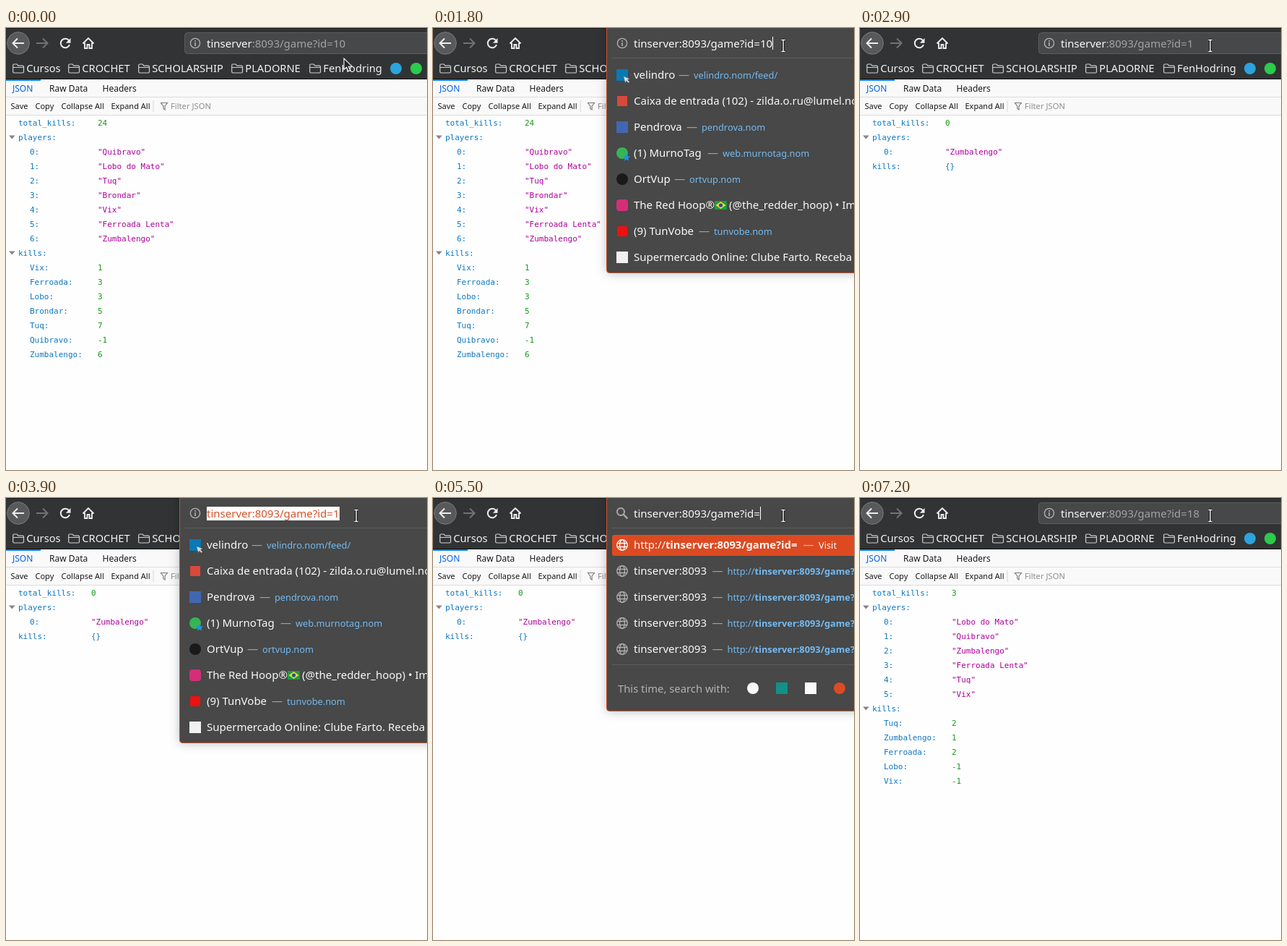
An HTML page that plays this animation: 583 by 611 pixels, repeating every 8 s.

```html
<!DOCTYPE html>
<html lang="en">
<head>
<meta charset="utf-8">
<title>JSON viewer</title>
<style>
  html, body { margin: 0; width: 100%; height: 100%; overflow: hidden; background: #fefefe; }
  svg { display: block; width: 583px; height: 611px; font: 15px "Noto Sans", "Open Sans", sans-serif; }
  text { white-space: pre; }
  .mono { font: 11px "DejaVu Sans Mono", monospace; }
  .key { fill: #0b77c2; }
  .num { fill: #129a12; }
  .str { fill: #ad009b; }
  .mark { font-size: 14.67px; fill: #f4f4f5; }
  .tab { font-size: 12px; }
  .tool { font-size: 11px; fill: #18181a; }
  .link { font-size: 12.8px; fill: #75baf2; }
  .line { fill: none; stroke-width: 1.3; }
  .panel { filter: drop-shadow(0 0 7px rgba(0, 0, 0, .25)); }
</style>
</head>
<body>
<svg id="stage" viewBox="0 0 583 611"></svg>
<script>
const LOOP = 8000;
const HOST = 'tinserver', PORT = ':8093';
const stage = document.getElementById('stage');

const rect = (x, y, w, h, fill, extra = '') =>
  `<rect x="${x}" y="${y}" width="${w}" height="${h}" fill="${fill}" ${extra}/>`;
const disc = (x, y, r, fill) => `<circle cx="${x}" cy="${y}" r="${r}" fill="${fill}"/>`;
const text = (x, y, s, cls = '', fill = '') =>
  `<text x="${x}" y="${y}" class="${cls}" ${fill && `fill="${fill}"`}>${s}</text>`;
const path = (d, stroke, width = 1.3) =>
  `<path d="${d}" class="line" stroke="${stroke}" style="stroke-width:${width}"/>`;
const shape = (d, fill, extra = '') => `<path d="${d}" fill="${fill}" ${extra}/>`;

// JSON pages
const QUI = 'Quibravo', LOBO = 'Lobo do Mato', TUQ = 'Tuq', BRON = 'Brondar',
      VIX = 'Vix', FER = 'Ferroada Lenta', ZUM = 'Zumbalengo';

const pages = {
  first: {
    x: 127, total: 24,
    players: [QUI, LOBO, TUQ, BRON, VIX, FER, ZUM],
    kills: [[VIX, 1], [FER, 3], [LOBO, 3], [BRON, 5], [TUQ, 7], [QUI, -1], [ZUM, 6]]
  },
  second: { x: 118, total: 0, players: [ZUM], kills: [] },
  third: {
    x: 127, total: 3,
    players: [LOBO, QUI, ZUM, FER, TUQ, VIX],
    kills: [[TUQ, 2], [ZUM, 1], [FER, 2], [LOBO, -1], [VIX, -1]]
  }
};

function drawPage(name) {
  let out = rect(0, 70, 583, 541, '#fefefe');
  const page = pages[name];
  if (!page) return out;

  out += rect(0, 71, 583, 50, '#f9f9fa') + rect(0, 95, 583, 1, '#dcdcde') +
    rect(0, 120, 583, 1, '#dcdcde') + rect(0, 71, 48, 2, '#0a84ff') +
    text(9, 88, 'JSON', 'tab', '#0060df') + text(60, 88, 'Raw Data', 'tab', '#18181a') +
    text(133.5, 88, 'Headers', 'tab', '#18181a');
  [[6.5, 'Save'], [40.5, 'Copy'], [76.5, 'Collapse All'], [145.5, 'Expand All']]
    .forEach(([x, s]) => out += text(x, 112, s, 'tool'));
  out += rect(203.5, 100, 1, 16, '#d7d7db') +
    path('M214.5 103.5h9l-3.4 4.5v5l-2.2-1.6v-3.4z', '#77777a', 1.1) +
    `<text x="228" y="112" style="font-size:11.2px" fill="#8e8e92">Filter JSON</text>`;

  let y = 135;
  const row = (x, key, value, cls, fold) => {
    if (fold) out += shape(`M4 ${y - 6.5}h8.6l-4.3 5z`, '#858588');
    out += text(x, y, key + ':', 'mono key');
    if (value !== undefined) out += text(page.x, y, value, 'mono ' + cls);
    y += 20;
  };
  row(17, 'total_kills', page.total, 'num');
  row(17, 'players', undefined, '', true);
  page.players.forEach((p, i) => row(33, i, `"${p}"`, 'str'));
  if (!page.kills.length) {
    row(17, 'kills', '{}', 'key');
  } else {
    row(17, 'kills', undefined, '', true);
    page.kills.forEach(([p, n]) => row(33, p.split(' ')[0], n, 'num'));
  }
  return out;
}

// Browser toolbar
function drawChrome() {
  const ink = '#ededee';
  let out = rect(0, 0, 583, 70, '#323334') + rect(0, 0, 583, 1, '#1c1c1d') +
    rect(0, 70, 583, 1, '#0c0c0d') +
    `<circle cx="17" cy="21" r="15.3" fill="#58595a" stroke="#7b7b7c"/>` +
    path('M25 21H10M16 14.5L9.5 21l6.5 6.5', ink, 2) +
    path('M42 21h15M51 14.5l6.5 6.5-6.5 6.5', '#727274', 2) +
    path('M87.2 17.3A6.3 6.3 0 1 0 88 23.2', ink, 2) + shape('M89.5 14v6.7h-6.7z', ink) +
    path('M106.5 21.5L114 14l7.500 7.500M109 20.500v7.500h3.500v-5h3v5h3.500v-7.500', ink, 1.9);
  [[9, 'Cursos'], [86, 'CROCHET'], [183, 'SCHOLARSHIP'], [312, 'PLADORNE'], [420, 'FenHodring']]
    .forEach(([x, s]) => {
      out += path(`M${x + .7} 60.500v-9q0-1.500 1.500-1.500h3.800l2 2.200h6q1.500 0 1.500 1.500v6.800q0 1.500-1.500 1.500h-11.800q-1.500 0-1.500-1.500zM${x + 1} 54.500h14`, '#cfcfd0', 1.2);
      out += text(x + 19.3, 61, s, 'mark');
    });
  return out + disc(540, 56, 8, '#2ba3dc') + disc(568, 56, 8, '#2bcb4b');
}

const info = () => `<circle cx="262" cy="21" r="6.6" class="line" stroke="#b4b4b5"/>` +
  rect(261.2, 20, 1.6, 5, '#b4b4b5') + rect(261.2, 17, 1.6, 1.8, '#b4b4b5');
const lens = () => `<circle cx="260" cy="19" r="5" class="line" style="stroke-width:2" stroke="#a9a9aa"/>` +
  path('M263.800 22.800l5.500 5.500', '#a9a9aa', 2.4);
const globe = (y, c) => `<g class="line" stroke="${c}"><circle cx="262" cy="${y}" r="7.300"/>` +
  `<ellipse cx="262" cy="${y}" rx="3.400" ry="7.300"/>` +
  `<path d="M255 ${y - 2.5}h14M255 ${y + 2.5}h14"/></g>`;
const box = (y, fill, size = 16, r = 0) =>
  rect(262 - size / 2, y - size / 2, size, size, fill, `rx="${r}"`);
const star = y => shape(`M268 ${y - 5}l1.500 3.300 3.500.400-2.600 2.400.800 3.500-3.200-1.800-3.200 1.800.800-3.500-2.600-2.400 3.500-.400z`, '#2390ee');
const arrowBadge = y => shape(`M264 ${y}l8 3.200-3 1.200 3 3-1.400 1.400-3-3-1.200 3z`, '#d8d8d9');
const flag = y => rect(390, y - 6, 17, 12, '#1b9b43') +
  shape(`M398.500 ${y - 5}l7 5-7 5-7-5z`, '#f7d532') + disc(398.5, y, 2.6, '#2b4a9b');

// Suggestion rows: icon, title, x of the dash, link, optional extra
const history = [
  { icon: y => box(y, '#0c78b4') + arrowBadge(y + 2), title: 'velindro', dash: 340, link: 'velindro.nom/feed/' },
  { icon: y => box(y, '#d9483b', 14), title: 'Caixa de entrada (102) - zilda.o.ru@lumel.nom' },
  { icon: y => box(y, '#4267b2'), title: 'Pendrova', dash: 351, link: 'pendrova.nom' },
  { icon: y => disc(262, y, 8, '#35b553') + star(y + 6), title: '(1) MurnoTag', dash: 380, link: 'web.murnotag.nom' },
  { icon: y => disc(262, y, 8, '#1b1a1b'), title: 'OrtVup', dash: 334, link: 'ortvup.nom' },
  { icon: y => box(y, '#d32f78', 16, 4), title: 'The Red Hoop®',
    extra: y => flag(y) + text(410, y + 5, '(@the_redder_hoop) • Imbora') },
  { icon: y => box(y, '#ee1010', 14, 2), title: '(9) TunVobe', dash: 368, link: 'tunvobe.nom' },
  { icon: y => box(y, '#f1f1f1'), title: 'Supermercado Online: Clube Farto. Receba seus' }
];
const visit = {
  icon: y => globe(y, '#b0b0b1'), title: HOST + PORT, dash: 386.5,
  link: `http://<tspan font-weight="bold">${HOST + PORT}/game?id=1</tspan>`
};

function drawRow(row, y) {
  let out = row.icon(y) + text(278, y + 5, row.title);
  if (row.link) out += text(row.dash, y + 5, '—', '', '#a2a2a3') +
    text(row.dash + 21, y + 5, row.link, 'link');
  return out + (row.extra ? row.extra(y) : '');
}

const caretX = id => 453.5 + 8.4 * id.length;

function drawTop(id) {
  return rect(248, 51, 340, 29, '#dd4a21', 'rx="3"') + globe(65, '#fff') +
    `<text x="278" y="70" style="font-size:14.8px">http://<tspan font-weight="bold">${HOST + PORT}/game?id=${id}</tspan></text>` +
    text(caretX(id) + 59, 70, '—', '', '#f3b8a5') +
    `<text x="${caretX(id) + 80.5}" y="70" style="font-size:12.8px">Visit</text>`;
}

function drawSearch(n) {
  const y = 83 + 36 * n;
  return rect(248, 50 + 36 * n, 335, 1, '#5d5e5e') +
    `<text x="256" y="${y + 5.500}" style="font-size:14.8px" fill="#b2b2b3">This time, search with:</text>` +
    disc(443, y, 8, '#fafafa') + rect(475, y - 8, 16, 16, '#12908a') +
    rect(515, y - 8, 16, 16, '#fafafa') + disc(563, y, 8, '#dc4a26');
}

function drawUrl(s) {
  const tail = `${PORT}/game?id=${s.id}`;
  if (!s.open) {
    return rect(247.5, 6.5, 345, 29, '#474849', 'rx="4" stroke="#5c5d5e"') + info() +
      text(278, 26.5, `${HOST}<tspan fill="#a3a3a4">${tail}</tspan>`, '', '#f9f9fa');
  }
  const n = s.rows.length + (s.typed ? 1 : 0);
  const bottom = n ? 50.5 + 36 * n + (s.typed ? 64 : 0) : 42.5;
  let out = rect(240.5, -20, 400, bottom + 20, '#474847', 'rx="4" stroke="#c9502f" class="panel"');
  if (n) out += rect(248, 41, 335, 1, '#5d5e5e');
  out += s.icon === 'lens' ? lens() : info();
  if (s.sel) out += rect(278, 12, caretX(s.id) - 278, 19, '#fff');
  out += text(278, 26.5, HOST + tail, '', s.sel ? '#d5512b' : '#f9f9fa');
  if (s.caret) out += rect(Math.floor(caretX(s.id)), 12, 1, 18, '#fff');
  const first = s.typed ? 1 : 0;
  if (first) out += drawTop(s.topId ?? s.id) + drawSearch(n);
  s.rows.forEach((r, i) => out += drawRow(r, 65 + 36 * (i + first)));
  return `<g fill="#f9f9fa">${out}</g>`;
}

function drawPointer(p) {
  const x = 468 + 17 * p, y = 42 - 18 * p;
  if (y > 36) {
    return shape(`M${x} ${y}v15.500l3.600-3.300 2.400 5.600 2.700-1.200-2.400-5.400h5z`, '#252526',
      'stroke="#fff" stroke-width="1.1"');
  }
  const d = `M${x - 2.500} ${y - 7.500}h2l.500.500.500-.500h2M${x} ${y - 7}v15M${x - 2.500} ${y + 8.500}h2l.500-.500.500.500h2`;
  return path(d, '#111', 3.6) + path(d, '#fff', 1.4);
}

// Each step changes only the listed parts of the state
const stale = history.slice(1);
const typing = { sel: false, caret: true, typed: true, icon: 'lens' };
const closed = { open: false, typed: false, sel: false, caret: false, icon: 'info', rows: [] };
const focus = { open: true, sel: true, rows: [] };
const steps = [
  [0, { page: 'first', id: '10', ...closed }],
  [700, focus],
  [800, { rows: history }],
  [1800, { sel: false, caret: true }],
  [2300, { id: '1', rows: stale, ...typing }],
  [2400, { rows: [] }],
  [2600, { typed: false, caret: false }],
  [2700, closed],
  [2800, { page: 'blank' }],
  [2900, { page: 'second' }],
  [3800, focus],
  [3900, { rows: history }],
  [4500, { sel: false, caret: true }],
  [5200, { id: '' }],
  [5300, { rows: stale, ...typing }],
  [5500, { rows: Array(4).fill(visit) }],
  [6200, { caret: false }],
  [6400, { id: '1', caret: true }],
  [6600, { rows: [visit] }],
  [6800, { id: '18' }],
  [6900, closed],
  [7000, { page: 'blank' }],
  [7200, { page: 'third' }]
];

let shown = '';
function render(t) {
  const past = steps.filter(([at]) => at <= t);
  const move = Math.min(6, Math.floor(t / 100)) / 6;
  const key = past.length + '/' + move;
  if (key === shown) return;
  shown = key;
  const state = Object.assign({}, ...past.map(([, change]) => change));
  stage.innerHTML = drawPage(state.page) + drawChrome() + drawUrl(state) + drawPointer(move);
}

const start = performance.now();
function tick() {
  render((performance.now() - start) % LOOP);
  requestAnimationFrame(tick);
}
tick();
</script>
</body>
</html>
```
